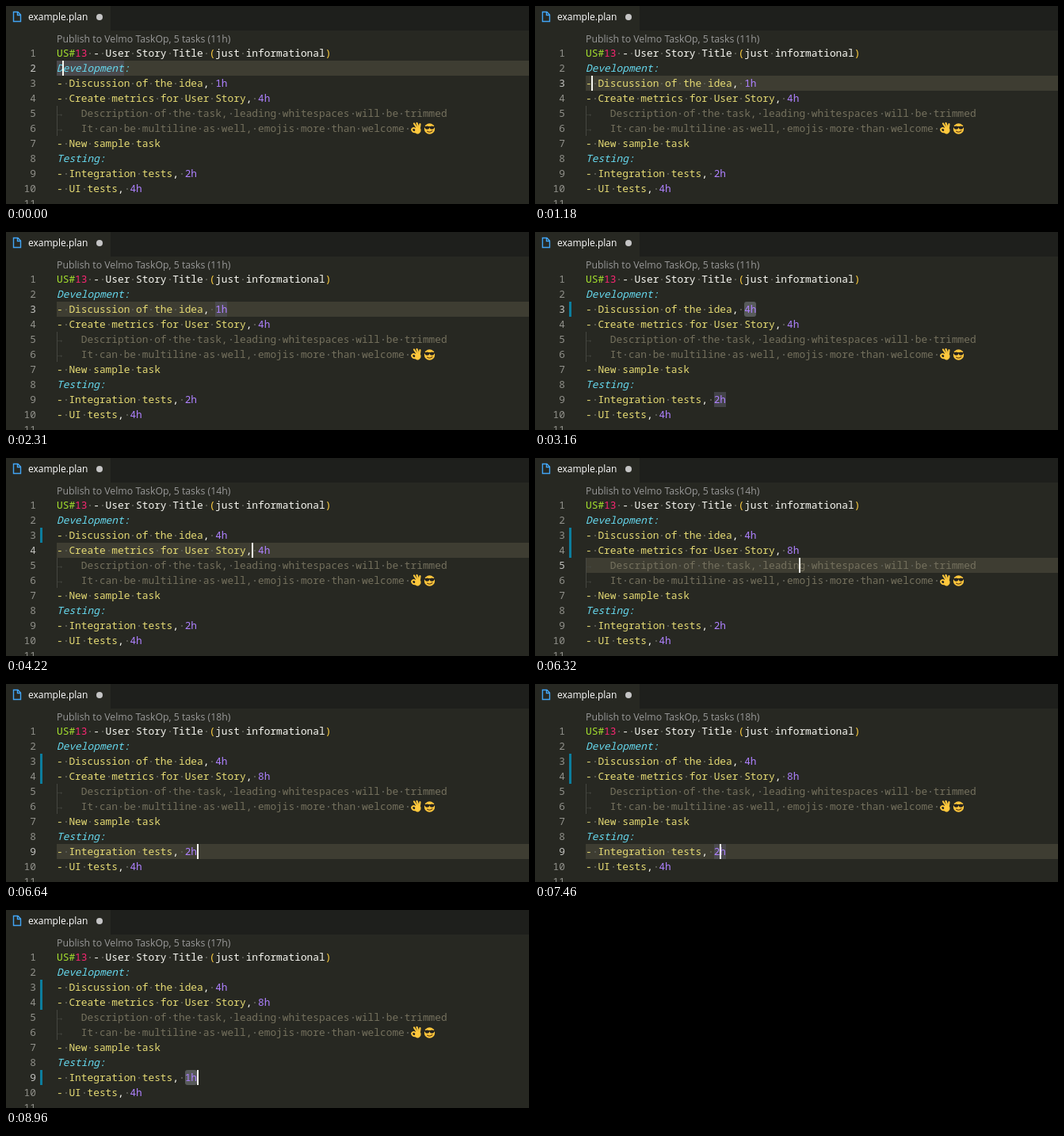
Recreate the animation shown at these times as an HTML page with a canvas. Size 660 by 250 pixels, loop 9140 ms.

```html
<!DOCTYPE html>
<html lang="en">
<head>
<meta charset="utf-8">
<title>example.plan</title>
<style>
  html, body { margin: 0; width: 100%; height: 100%; overflow: hidden; background: #272822; }
  canvas { display: block; }
</style>
</head>
<body>
<canvas id="stage" width="660" height="250"></canvas>
<script>
(() => {
const ctx = document.getElementById('stage').getContext('2d', { alpha: false });
const LOOP = 9140, LEFT = 64, CELL = 7.698, ROW = 19;
const MONO = '12.83px "Noto Sans Mono", "DejaVu Sans Mono", monospace';
const UI = '"Open Sans", "Noto Sans", sans-serif';
const C = {
  bg: '#272822', tabs: '#1e1f1c', line: '#3e3d32', white: '#f8f8f2', green: '#a6e22e',
  pink: '#f92672', blue: '#66d9ef', yellow: '#e6db74', gold: '#ffcf40', purple: '#ae81ff',
  note: '#75715e', faint: '#464741', dot: '#55564f', number: '#90908a', active: '#c2c2bf',
  lens: '#999999', bar: '#0c7d9d', select: 'rgba(135,139,145,.5)', word: 'rgba(82,82,92,.65)'
};

// Spans are [line, first column, last column].
const FIRST = [3, 26, 28], SECOND = [4, 33, 35], THIRD = [9, 21, 23], LAST = [10, 12, 14];
const TITLE_STORY = [1, 13, 18], TASK_STORY = [4, 26, 31];

const initial = {
  line: 2, col: 1, cursor: true, sel: null, words: [[2, 0, 11]],
  first: 1, second: 4, third: 2, total: 11, bars: []
};

// Each entry changes the editor state from its time onwards.
const steps = [
  [500, { cursor: false }],
  [1000, { cursor: true }],
  [1180, { line: 3, words: [] }],
  [1490, { col: 28 }],
  [1680, { col: 27 }],
  [1810, { words: [FIRST] }],
  [2310, { cursor: false }],
  [2670, { sel: FIRST, words: [] }],
  [2790, { first: 2 }],
  [2910, { words: [THIRD] }],
  [3040, { first: 3 }],
  [3160, { first: 4, bars: [3] }],
  [3410, { line: 4, col: 28, cursor: true, sel: null, words: [], total: 14 }],
  [3660, { words: [TITLE_STORY, TASK_STORY] }],
  [3840, { col: 31, words: [] }],
  [4220, { col: 32 }],
  [4580, { col: 35 }],
  [4700, { col: 34 }],
  [4830, { words: [FIRST, SECOND, LAST] }],
  [4950, { col: 35, sel: SECOND, words: [FIRST, LAST] }],
  [5080, { second: 5 }],
  [5210, { words: [] }],
  [5340, { second: 6 }],
  [5590, { second: 7 }],
  [5820, { second: 8 }],
  [5890, { bars: [3, 4] }],
  [6270, { line: 5, sel: null }],
  [6360, { line: 6 }],
  [6460, { line: 7, col: 17, total: 18 }],
  [6550, { line: 8, col: 8 }],
  [6640, { line: 9, col: 23 }],
  [6710, { line: 10, col: 14 }],
  [7080, { line: 9, col: 23 }],
  [7330, { col: 22 }],
  [7460, { words: [THIRD] }],
  [7960, { cursor: false }],
  [8330, { col: 23, cursor: true, sel: THIRD, words: [] }],
  [8460, { third: 1 }],
  [8700, { bars: [3, 4, 9] }],
  [8960, { total: 17 }]
];

const stateAt = t => Object.assign({}, initial, ...steps.filter(s => s[0] <= t).map(s => s[1]));
const rowY = line => 50 + ROW * (line - 1);
const colX = col => LEFT + col * CELL;

function rect(color, x, y, w, h) {
  ctx.fillStyle = color;
  ctx.fillRect(x, y, w, h);
}

function write(str, x, y, color, font) {
  ctx.font = font;
  ctx.fillStyle = color;
  ctx.fillText(str, x, y);
}

function disc(x, y, rx, ry, color, angle = 0) {
  ctx.beginPath();
  ctx.ellipse(x, y, rx, ry, angle, 0, Math.PI * 2);
  ctx.fillStyle = color;
  ctx.fill();
}

function stroke(path, color, width) {
  ctx.strokeStyle = color;
  ctx.lineWidth = width;
  ctx.stroke(new Path2D(path));
}

function mark([line, from, to], color, radius = 0) {
  ctx.beginPath();
  ctx.roundRect(Math.round(colX(from)), rowY(line), Math.round((to - from) * CELL), ROW, radius);
  ctx.fillStyle = color;
  ctx.fill();
}

const task = (name, hours) => [
  ['- ' + name, C.yellow],
  ...(hours ? [[', ', C.white], [hours + 'h', C.purple]] : [])
];
const heading = name => [[name, C.blue, 'italic ']];
const note = str => [['\t' + str, C.note]];

const documentLines = s => [
  [['US#', C.green], ['13', C.pink], [' - User Story Title ', C.white], ['(', C.gold],
    ['just informational', C.white], [')', C.gold]],
  heading('Development:'),
  task('Discussion of the idea', s.first),
  task('Create metrics for User Story', s.second),
  note('Description of the task, leading whitespaces will be trimmed'),
  note('It can be multiline as well, emojis more than welcome '),
  task('New sample task'),
  heading('Testing:'),
  task('Integration tests', s.third),
  task('UI tests', 4),
  []
];

function drawTokens(tokens, line) {
  const y = rowY(line);
  let col = 0;
  for (const [str, color, style = ''] of tokens) {
    for (const part of str.split(/([ \t])/)) {
      if (part === '\t') {
        rect(C.faint, LEFT, y, 1, ROW);
        write('→', LEFT, y + 14, C.faint, MONO);
        col += 4;
        continue;
      }
      if (part === ' ') rect(C.dot, Math.round(colX(col) + 3), y + 9, 2, 2);
      else write(part, colX(col), y + 14, color, style + MONO);
      col += part.length;
    }
  }
}

function drawEmojis() {
  const skin = '#ffc83d', dark = '#25231f';
  ctx.lineCap = 'round';
  stroke('M518 153L515 148.500M520 152L518.500 148M522 153L522.500 149', skin, 2.2);
  disc(519.5, 157, 4, 4.5, skin, 0.3);
  stroke('M517 159C513 160 511 156 513 154.500S517 155 518 157', skin, 2);
  disc(515, 156.8, 1.3, 1.3, C.bg);
  disc(534.5, 155, 6.7, 6.7, skin);
  rect(dark, 528, 152, 13, 1.5);
  disc(531.5, 153.6, 2.7, 2.2, dark);
  disc(537.5, 153.6, 2.7, 2.2, dark);
  stroke('M531.500 158Q535 160.500 538 157.500', '#6b4519', 1.1);
  ctx.lineCap = 'butt';
}

function drawTabs() {
  rect(C.tabs, 132, 0, 528, 31);
  stroke('M9.500 7.500H15L18.500 11V19.500H9.500ZM14.500 8V11.500H18', '#42a5f5', 1.4);
  write('example.plan', 28, 18, '#ffffff', '12px ' + UI);
  disc(118, 14, 4, 4, '#c5c5c5');
}

function draw(s) {
  rect(C.bg, 0, 0, 660, 250);
  drawTabs();
  write(`Publish to Velmo TaskOp, 5 tasks (${s.total}h)`, LEFT, 46, C.lens, '12.3px ' + UI);

  if (!s.sel) rect(C.line, LEFT, rowY(s.line), 660 - LEFT, ROW);
  s.words.forEach(w => mark(w, C.word));
  if (s.sel) mark(s.sel, C.select, 3);
  s.bars.forEach(line => rect(C.bar, 43, rowY(line), 3, ROW));

  documentLines(s).forEach((tokens, i) => {
    const line = i + 1, label = String(line);
    const color = line === s.line ? C.active : C.number;
    write(label, 38 - label.length * CELL, rowY(line) + 14, color, MONO);
    drawTokens(tokens, line);
  });
  drawEmojis();
  if (s.cursor) rect('#f8f8f0', Math.floor(colX(s.col)), rowY(s.line), 2, ROW);
}

function frame() {
  draw(stateAt(performance.now() % LOOP));
  requestAnimationFrame(frame);
}
frame();
})();
</script>
</body>
</html>
```
